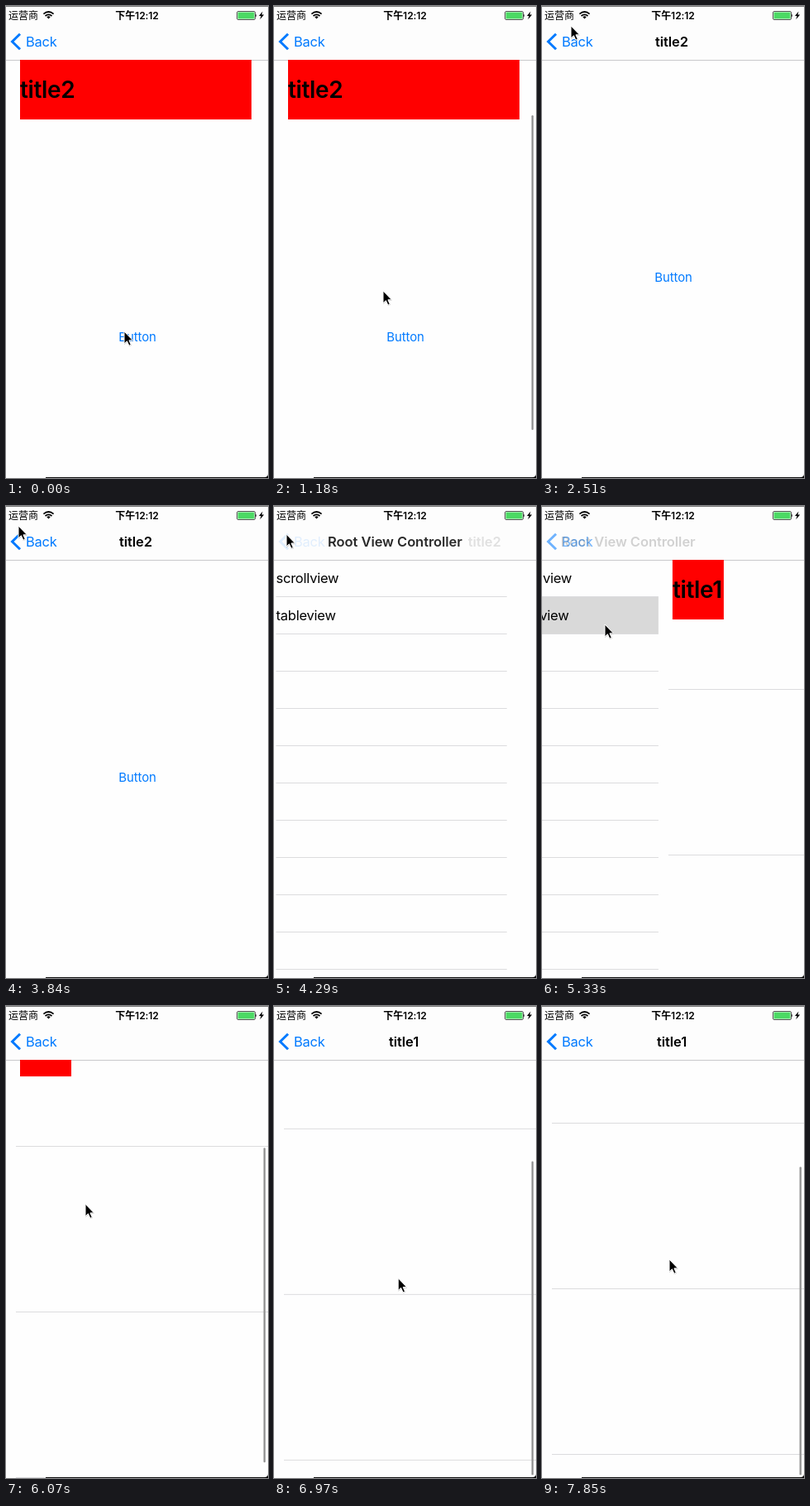
Recreate the animation shown at these times as an HTML page. Size 317 by 570 pixels, loop 8000 ms.

```html
<!DOCTYPE html>
<html lang="en">
<head>
<meta charset="utf-8">
<title>Large title scrolling</title>
<style>
  html, body { margin: 0; width: 100%; height: 100%; overflow: hidden; background: #fff; }
  svg { display: block; width: 317px; height: 570px; }
  text { font-family: Inter, "Noto Sans CJK SC", "Noto Sans CJK", sans-serif; font-size: 16.5px; letter-spacing: -.22px; }
  .status { font-size: 12px; letter-spacing: 0; }
  .bold { font-weight: 600; letter-spacing: -.05px; }
  .big { font-size: 28px; font-weight: 600; letter-spacing: -.35px; }
  .blue { fill: #007aff; }
  .button { font-size: 14.9px; letter-spacing: -.05px; }
  .mid { text-anchor: middle; }
</style>
</head>
<body>
<svg viewBox="0 0 317 570">
  <rect width="317" height="570" fill="#fefefe"/>
  <path d="M0 65.5H317" stroke="#c9c9cb"/>

  <g id="root">
    <rect y="66" width="317" height="504" fill="#fefefe"/>
    <rect id="highlight" y="110" width="317" height="45" fill="#d9d9d9"/>
    <path id="rows" stroke="#dcdcde"/>
    <text x="13" y="93">scrollview</text>
    <text x="13" y="138">tableview</text>
  </g>

  <g id="detail">
    <rect y="66" width="317" height="504" fill="#fefefe"/>
    <g id="content">
      <path id="cells" stroke="#dcdcde"/>
      <rect id="banner" x="17" y="65" height="72" fill="#f00"/>
      <text id="bigTitle" class="big" x="17" y="111"></text>
      <text id="button" class="blue button mid" x="159" y="404.5">Button</text>
    </g>
    <rect id="indicator" x="311.5" width="2.5" rx="1.2" fill="#999"/>
  </g>

  <rect width="317" height="65" fill="#fdfdfd"/>
  <path d="M0 .5H317" stroke="#777"/>
  <text class="status" x="3" y="15.5">运营商</text>
  <g fill="none" stroke="#000" stroke-width="1.7">
    <path d="M45.4 9.6Q51.5 4.4 57.6 9.6M47.5 12Q51.5 8.6 55.5 12"/>
    <path d="M49.3 13.2Q51.5 11.4 53.7 13.2L51.5 15.6Z" fill="#000" stroke="none"/>
  </g>
  <text class="status bold mid" x="158.5" y="15.5">下午12:12</text>
  <rect x="279.5" y="6.5" width="22" height="10" rx="1.5" fill="#fff" stroke="#555"/>
  <rect x="280.5" y="7.5" width="20" height="8" rx=".5" fill="#4cd964"/>
  <path d="M302 9.5q2 2 0 4z" fill="#333"/>
  <path d="M310.5 6.5L306 12h2.6l-1.4 4.3 5-5.8h-2.8z"/>

  <g id="back" class="blue">
    <path d="M17 33.7L7.5 43L17 52.3" fill="none" stroke="#007aff" stroke-width="3"/>
    <text x="24" y="49">Back</text>
  </g>
  <text id="rootTitle" class="bold mid" x="157" y="49">Root View Controller</text>
  <text id="navTitle" class="bold mid" x="157" y="49"></text>

  <path d="M48 569.5H317" stroke="#111"/>
  <path d="M317 565Q317 569 313 569V570H317Z"/>
  <g id="cursor">
    <path d="M0 1V16L4 13L6 18L9 17L7 12H11Z" fill="#000" opacity=".2"/>
    <path d="M0 0V14.8L3.4 11.7L5.9 17.2L8.3 16.2L5.9 10.8H10.4Z" stroke="#fff"/>
  </g>
</svg>
<script>
const LOOP = 8000, STEP = 148, LEAD = 12; // the picture is held for each step
const COLLAPSE = 72;                      // scroll distance that hides the large title

const el = id => document.getElementById(id);
const ramp = (k, from, to) => Math.max(0, Math.min(1, (k - from) / (to - from)));
const smooth = t => t * t * (3 - 2 * t);
const easeOut = t => 1 - (1 - t) ** 2;

// Places the pointer visits: step, x, y.
const stops = [
  [0, 143, 393], [3, 143, 357], [8, 132, 344], [10, 132, 292], [17, 35, 24], [21, 160, 324],
  [26, 15, 24], [30, 15, 36], [33, 76, 143], [37, 76, 143], [39, 96, 288], [42, 96, 222],
  [46, 150, 330], [53, 154, 306]
];

function pointer(k) {
  const i = Math.max(1, stops.findIndex(stop => stop[0] >= k));
  const [k0, x0, y0] = stops[i - 1], [k1, x1, y1] = stops[i];
  const t = smooth(ramp(k, k0, k1));
  return [x0 + (x1 - x0) * t, y0 + (y1 - y0) * t];
}

// First page: a short drag springs back, a longer one collapses the title.
const pageScroll = k => 36 * (ramp(k, 0, 3) - easeOut(ramp(k, 5, 8)))
  + 53 * ramp(k, 8, 10) + 19 * ramp(k, 11, 13);
// Second page: collapse, then pull past the end.
const tableScroll = k => COLLAPSE * ramp(k, 39, 41.77) + 8 * ramp(k, 46, 53);
const pushed = k => 1 - easeOut(ramp(k, 27, 30)) + easeOut(ramp(k, 35, 38));
const barAlpha = k => ramp(k, 0, 1) - ramp(k, 15, 17) + ramp(k, 38, 39);

const lines = (x, y, gap, count) =>
  Array.from({ length: count }, (_, i) => `M${x} ${y + i * gap + .5}H318`).join('');
el('rows').setAttribute('d', lines(13, 109, 45, 11));
el('cells').setAttribute('d', lines(12, 221, 200, 3));

const move = (id, x, y) => el(id).setAttribute('transform', `translate(${x} ${y})`);
const fade = (id, alpha) => el(id).setAttribute('opacity', ramp(alpha, 0, 1));

function draw(k) {
  const table = k >= 32, title = table ? 'title1' : 'title2';
  const s = table ? tableScroll(k) : pageScroll(k);
  const over = Math.max(0, s - COLLAPSE), p = pushed(k);

  move('root', -95 * p, 0);
  move('detail', 317 * (1 - p), 0);
  move('content', 0, -s);
  move('cursor', ...pointer(k));

  el('bigTitle').textContent = el('navTitle').textContent = title;
  el('banner').setAttribute('width', table ? 62 : 280);
  fade('button', table ? 0 : 1);
  fade('cells', table ? 1 : 0);
  fade('highlight', k >= 35 ? 1 : 0);

  el('indicator').setAttribute('y', 132 + .755 * (s - over) + over);
  el('indicator').setAttribute('height', 380 - over);
  fade('indicator', barAlpha(k));

  move('rootTitle', -95 * p, 0);
  fade('rootTitle', 1 - p * 1.5);
  move('navTitle', 110 * (1 - p), 0);
  fade('navTitle', p * ramp(s, 56, 68));
  fade('back', p);
}

function tick() {
  draw(Math.floor((performance.now() % LOOP + LEAD) / STEP));
  requestAnimationFrame(tick);
}
tick();
</script>
</body>
</html>
```
